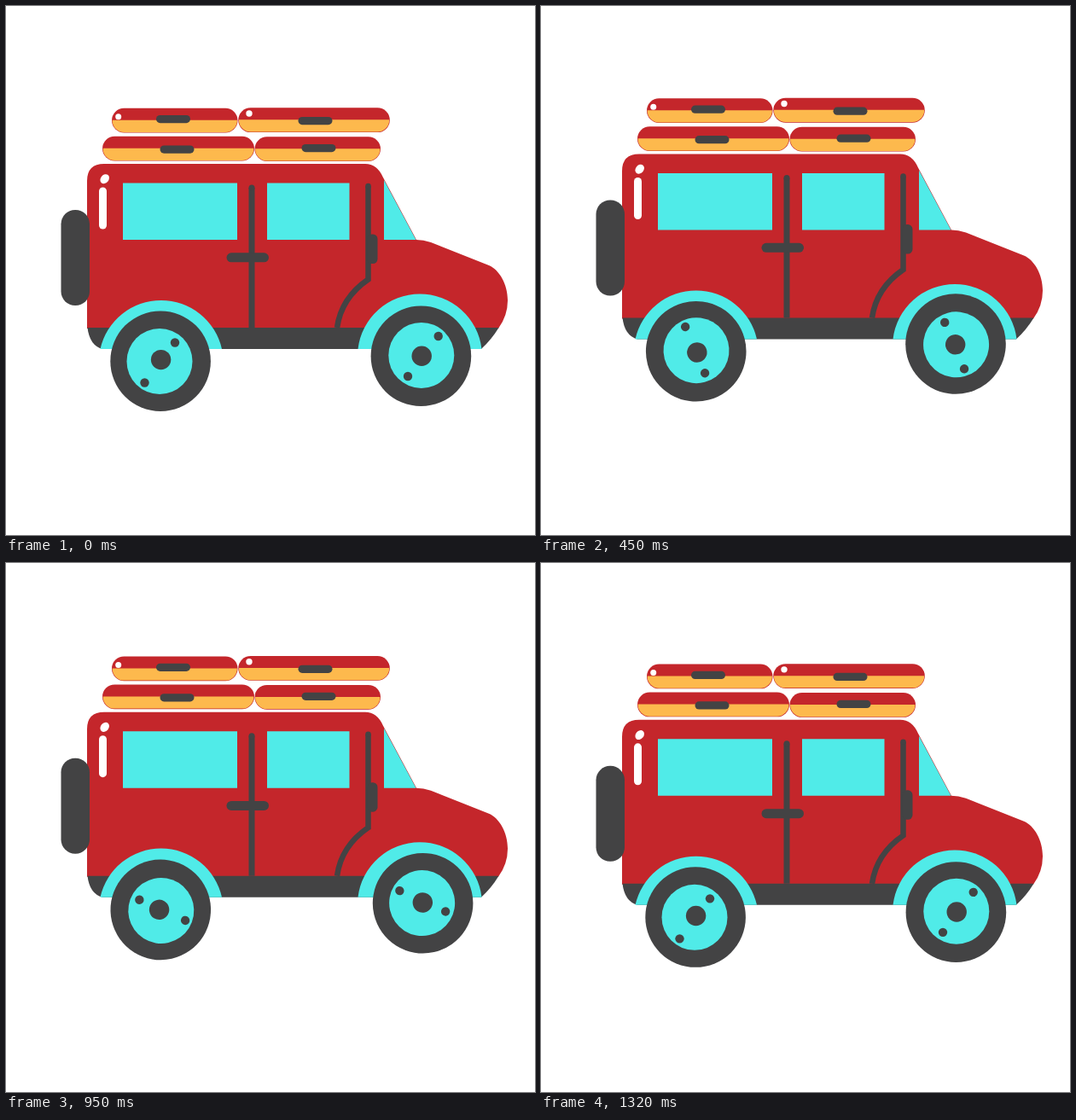
Recreate the animation shown at these times as an HTML page. Size 620x620 px, loop 1370 ms.

```html
<!DOCTYPE html>
<html lang="en">
<head>
<meta charset="utf-8">
<title>Bouncing jeep</title>
<style>
  html, body { margin: 0; height: 100%; overflow: hidden; background: #fff; }
  svg { display: block; width: 620px; height: 620px; }
  .red { fill: #c4262b; }
  .dark { fill: #434344; }
  .cyan { fill: #50ebe8; }
  .white { fill: #fff; }
  .line { fill: none; stroke: #434344; stroke-linecap: round; }
</style>
</head>
<body>
<svg viewBox="0 0 620 620">
  <g id="car">
    <g id="boards"></g>
    <path class="red" d="M95 205Q95 185 115 185H421Q435 185 442 201L481 274Q489 274 498 277L566 304C578 309 588 326 588 345Q588 363 577 378H95Z"/>
    <path class="dark" d="M95.500 377H577.500Q569 391 557 402H113Q98 398 95.500 377Z"/>
    <path class="cyan" d="M137 207.500H271V274H137ZM306 207.500H402.500V274H306ZM443 204V274H480.500Z"/>
    <path class="line" stroke-width="7" d="M288 213V377" style="stroke-linecap:butt"/>
    <circle class="dark" cx="288" cy="213" r="3.500"/>
    <path class="line" stroke-width="11" d="M264 294.800H302.500"/>
    <path class="line" stroke-width="6.500" d="M424.500 211V320.500Q393 342 388 377" style="stroke-linecap:butt"/>
    <circle class="dark" cx="424.500" cy="211" r="3.250"/>
    <rect class="dark" x="423.500" y="267.500" width="12" height="34.500" rx="5.500"/>
    <rect class="white" x="109" y="212.500" width="9" height="49" rx="4.500"/>
    <ellipse class="white" rx="4.700" ry="6" transform="translate(115.700 202.700) rotate(40)"/>
    <rect class="dark" x="64.500" y="239" width="33.500" height="112" rx="16.500"/>
    <path class="cyan" d="M110.500 402A73 73 0 0 1 253 402ZM412.500 402A73 73 0 0 1 557.500 402Z"/>
    <g id="wheels"></g>
  </g>
</svg>
<script>
const $ = id => document.getElementById(id);
const FRAMES = 30, STEP = 100 / 22, LOOP = 1370, LIFT = 17.2;

// x, y, width, handle x, handle y
const boards = [
  [124, 119.7, 147.5, 176, 128], [272.3, 119.3, 177.5, 342.5, 130],
  [113, 152.7, 178, 180.5, 163.5], [291.5, 153.2, 147.5, 346.5, 162]
];
$('boards').innerHTML = boards.map(([x, y, w, hx, hy]) => `
  <rect class="red" x="${x}" y="${y}" width="${w}" height="28.800" rx="14.400"/>
  <path fill="#fdb94d" d="M${x + .6} ${y + 14}H${x + w - .6}a13.800 13.800 0 0 1-13.800 14.200H${x + 14.4}a13.800 13.800 0 0 1-13.800-14.200"/>
  <rect class="dark" x="${hx}" y="${hy}" width="40" height="9.200" rx="4.600"/>`).join('') + `
  <circle class="white" cx="131.700" cy="129.700" r="3.500"/>
  <circle class="white" cx="285" cy="126" r="3.700"/>`;

// Parts sit slightly off the pivot, so the wheels wobble as they turn.
const wheels = [
  { pivot: [181.4, 416.4], tyre: [-.3, -.2], disc: [-1.4, .1], hub: [.2, -1.8], bolts: [[16.6, -21.9], [-18.9, 25.1]] },
  { pivot: [487, 408.8], tyre: [-.6, 1.5], disc: [-.2, .6], hub: [.2, 1.4], bolts: [[19.7, -21.8], [-16, 25.2]] }
];
const circle = (cls, [x, y], r) => `<circle class="${cls}" cx="${x}" cy="${y}" r="${r}"/>`;
$('wheels').innerHTML = wheels.map(w => '<g>' +
  circle('dark', w.tyre, 58.8) + circle('cyan', w.disc, 38.5) + circle('dark', w.hub, 11.7) +
  w.bolts.map(b => circle('dark', b, 5.2)).join('') + '</g>').join('');
const wheelNodes = [...$('wheels').children];

function draw(now) {
  const ticks = Math.floor(now % LOOP / 10);
  const frame = Math.min(FRAMES - 1, Math.floor((ticks + .5) / STEP));
  const lift = LIFT * (1 - Math.abs(frame / 15 - 1));
  const angle = frame < 15 ? frame * 12 : 180 + (frame - 15) * 180 / 14;
  $('car').setAttribute('transform', `translate(0 ${-lift})`);
  wheelNodes.forEach((node, i) =>
    node.setAttribute('transform', `translate(${wheels[i].pivot}) rotate(${angle})`));
}

const start = performance.now();
function tick() {
  draw(performance.now() - start);
  requestAnimationFrame(tick);
}
tick();
</script>
</body>
</html>
```
